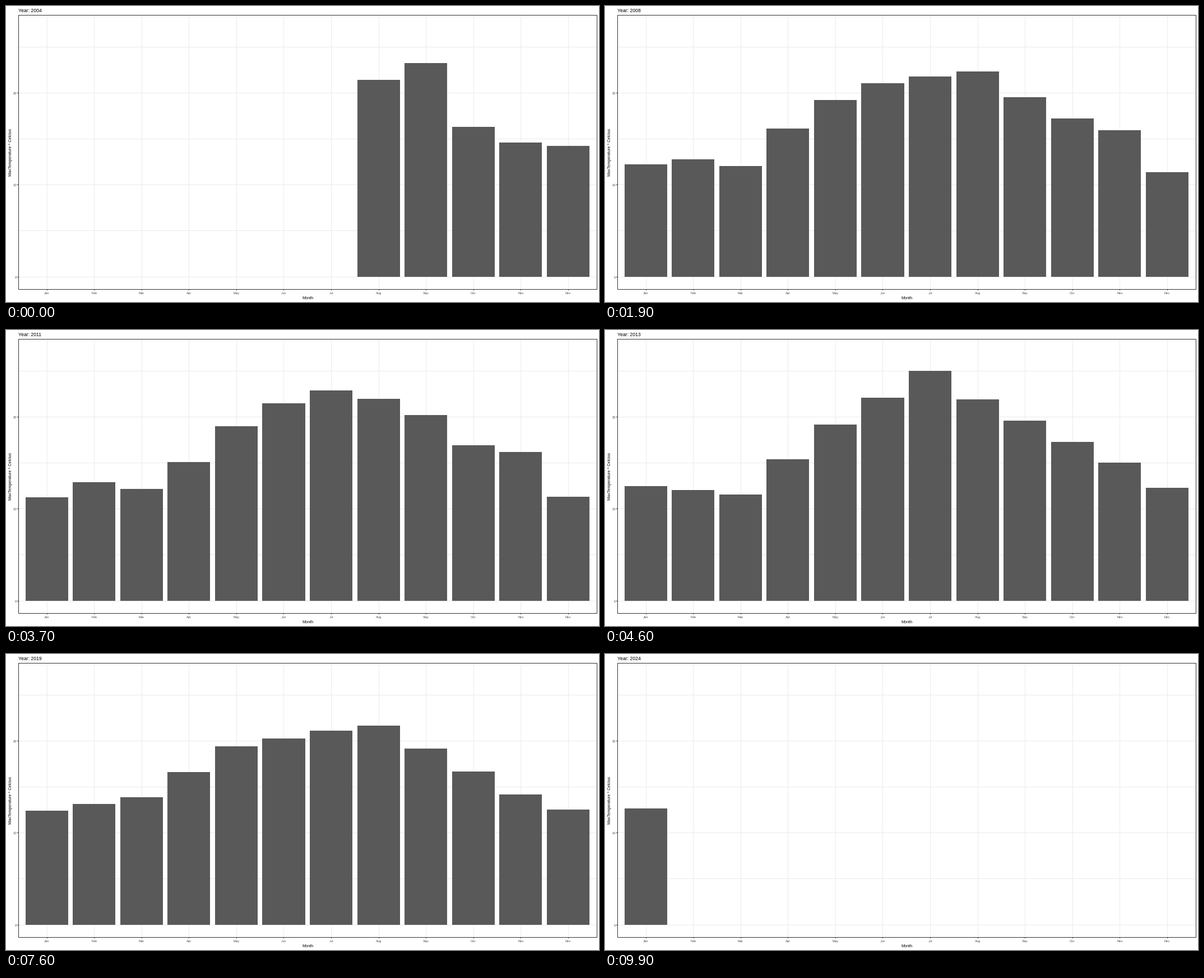
A matplotlib script that plays this animation: 1058 px wide and 529 px high, repeating every 10 s.

```python
import numpy as np
import matplotlib.pyplot as plt
from matplotlib.animation import FuncAnimation
from matplotlib.patches import Rectangle

W, H, DPI = 1058, 529, 100
PX = 72 / DPI
FRAMES, INTERVAL = 100, 100
FIRST, LAST = 2004, 2024
MONTHS = "Jan Feb Mar Apr May Jun Jul Aug Sep Oct Nov Dec".split()

STEP, UNIT = 84.57, 16.437          # pixels per month and per degree
JAN, ZERO = 73.1, 484.0
LEFT, RIGHT = JAN - 0.6 * STEP, JAN + 11.6 * STEP
TOP, BOTTOM = 16.3, 506.3
GRID, DARK, GREY = "#ebebeb", "#333333", "#4d4d4d"

# Seasonal shapes: temperature in a few months, straight lines between them.
KEY_MONTHS = [0, 2, 4, 6, 7, 10, 11]
SHAPES = {
    2006.2: [13.6, 14.3, 19.6, 23.6, 23.7, 14.9, 13.0],
    2009.6: [10.4, 12.9, 18.8, 21.7, 21.4, 15.6, 10.6],
    2013.2: [12.5, 11.4, 19.0, 25.3, 21.9, 14.9, 12.3],
    2016.2: [13.6, 13.1, 21.4, 22.3, 22.1, 15.6, 12.5],
    2019.4: [12.3, 13.9, 19.2, 21.0, 21.6, 14.0, 12.5],
}
FIRST_AUTUMN = [21.4, 23.2, 16.3, 14.6, 14.2]
LAST_JANUARY = 12.6


def build_years():
    """Monthly temperatures per year, NaN where there is no bar."""
    rng = np.random.default_rng(7)
    times = np.array(list(SHAPES))
    curves = np.array([np.interp(range(12), KEY_MONTHS, s)
                       for s in SHAPES.values()])
    rows = []
    for year in range(FIRST, LAST + 1):
        row = np.array([np.interp(year, times, c) for c in curves.T])
        if np.abs(times - year).min() >= 1:
            row += rng.normal(0, 0.8, 12)
        rows.append(row)
    rows[0][:7] = np.nan
    rows[0][7:] = FIRST_AUTUMN
    rows[-1][0] = LAST_JANUARY
    rows[-1][1:] = np.nan
    return np.array(rows)


YEARS = build_years()
KEYS = np.round(np.arange(len(YEARS)) * (FRAMES - 1) / (LAST - FIRST)).astype(int)


def temperatures(frame):
    k = np.searchsorted(KEYS, frame, side="right") - 1
    if KEYS[k] == frame:
        return YEARS[k]
    part = (frame - KEYS[k]) / (KEYS[k + 1] - KEYS[k])
    return YEARS[k] * (1 - part) + YEARS[k + 1] * part


plt.rcParams["font.family"] = "Liberation Sans"
fig = plt.figure(figsize=(W / DPI, H / DPI), dpi=DPI, facecolor="white")
ax = fig.add_axes([0, 0, 1, 1])
ax.set(xlim=(0, W), ylim=(H, 0))
ax.axis("off")


def mid(v):
    """Centre of the pixel that holds v."""
    return np.floor(v) + 0.5


def hline(y, x0, x1, color, z):
    ax.plot([x0, x1], [mid(y)] * 2, color=color, lw=PX, zorder=z,
            solid_capstyle="butt", snap=False)


def vline(x, y0, y1, color, z):
    ax.plot([mid(x)] * 2, [y0, y1], color=color, lw=PX, zorder=z,
            solid_capstyle="butt", snap=False)


def label(x, y, text, size, color="black", **kw):
    return ax.text(x, y, text, size=size * PX, color=color, **kw)


bars = []
for i, month in enumerate(MONTHS):
    x = JAN + i * STEP
    vline(x, TOP, BOTTOM, GRID, 1)
    vline(x, BOTTOM, BOTTOM + 2, DARK, 4)
    label(x - 0.4, 515.2, month, 5.9, GREY, ha="center")
    x0, x1 = np.floor([x - 0.45 * STEP, x + 0.45 * STEP])
    bar = Rectangle((x0, ZERO), x1 - x0, 0, fc="#595959", lw=0,
                    zorder=3, snap=False)
    bars.append(ax.add_patch(bar))

for value in range(0, 30, 5):
    y = ZERO - value * UNIT
    hline(y, LEFT, RIGHT, GRID, 1)
    if value % 10 == 0:
        hline(y, LEFT - 2.3, LEFT, DARK, 4)
        label(19.4, y + 2.6, str(value), 5.9, GREY, ha="right")

ax.add_patch(Rectangle((mid(LEFT), mid(TOP)), mid(RIGHT) - mid(LEFT),
                       mid(BOTTOM) - mid(TOP), fill=False, ec=DARK,
                       lw=PX, zorder=5, snap=False))
label(538, 524.3, "Month", 7.3, ha="center")
label(10.2, 261.5, "MaxTemperature * Celcius", 7.3, rotation=90,
      rotation_mode="anchor", ha="center", va="baseline")
title = label(22.4, 11.2, "", 8.7)


def draw(frame):
    for bar, value in zip(bars, temperatures(frame)):
        shown = bool(np.isfinite(value))
        bar.set_visible(shown)
        if shown:
            bar.set_height(np.floor(ZERO - value * UNIT) - ZERO)
    year = round(FIRST + (LAST - FIRST) * frame / (FRAMES - 1))
    title.set_text(f"Year: {year}")
    return bars + [title]


anim = FuncAnimation(fig, draw, frames=FRAMES, interval=INTERVAL,
                     repeat=True, repeat_delay=0)
plt.show()
```
